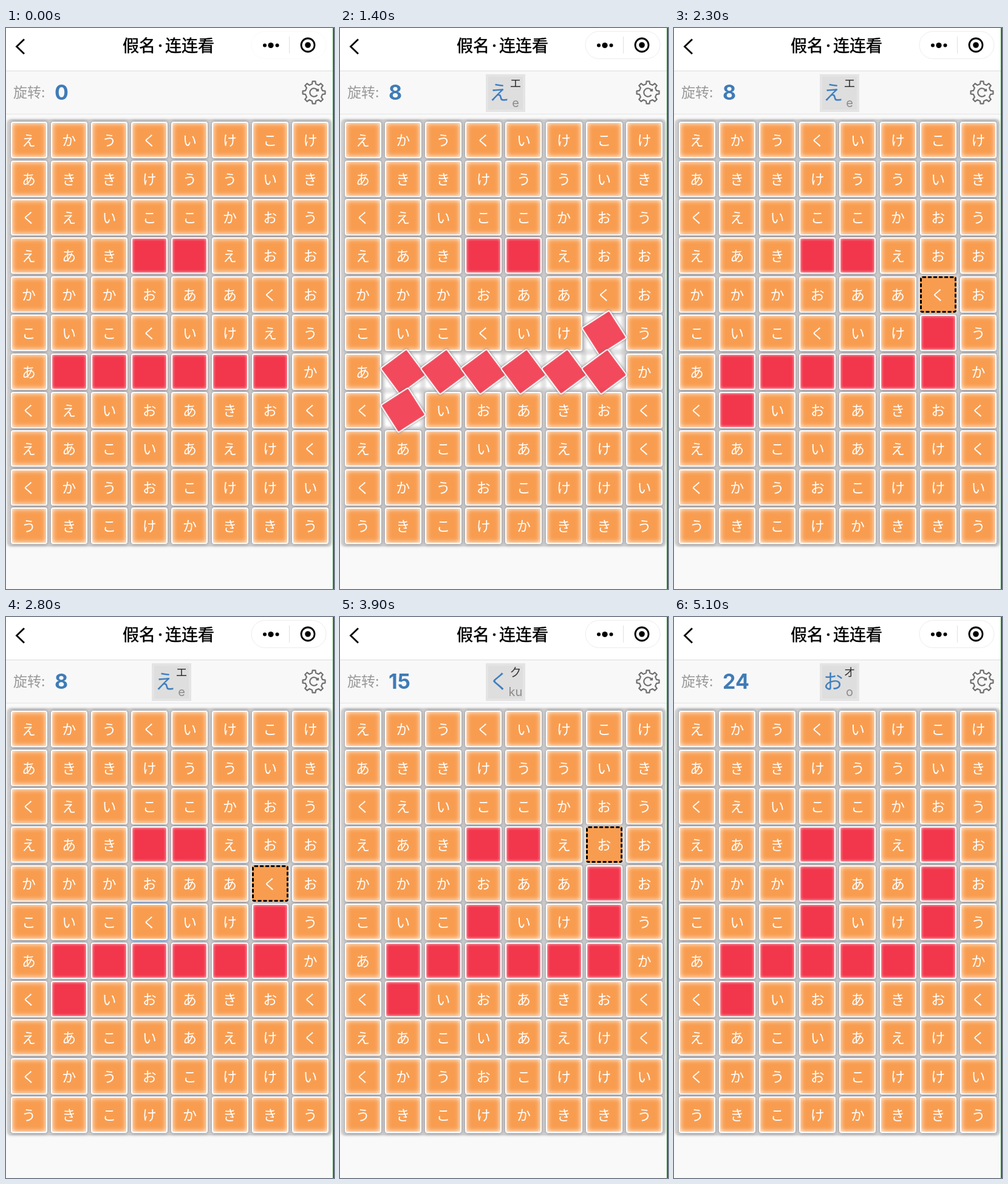
An HTML page for the animation above (5.2 s loop, 540 by 922 pixels).

```html
<!DOCTYPE html>
<html lang="zh">
<head>
<meta charset="utf-8">
<style>
html, body { margin: 0; width: 100%; height: 100%; overflow: hidden; background: #f9f9fa; }
#stage { position: relative; width: 540px; height: 922px; overflow: hidden; font-family: "Noto Sans CJK JP", "Noto Sans CJK SC", sans-serif; }
svg { position: absolute; left: 0; top: 0; }
#board {
  position: absolute; left: 4px; top: 152px; width: 530px; height: 698px;
  background:
    repeating-linear-gradient(90deg, #bbb6 0 2px, #fff0 7px 59px, #bbb6 64.2px 66.2px),
    repeating-linear-gradient(#bbb6 0 2px, #fff0 7px 56px, #bbb6 61.4px 63.4px), #fff;
  box-shadow: 0 0 5px #888;
}
.tile {
  position: absolute; box-sizing: border-box; width: 60px; height: 60px;
  border: 2px solid #fff; border-radius: 4px; background: #f89d50; color: #fff;
  font-size: 23px; font-weight: 300; line-height: 54px; text-align: center;
  box-shadow: 0 0 5px 1px #8a8a90, inset 0 0 8px #fff;
}
.red { background: #f2364c; color: transparent; box-shadow: 0 0 5px 1px #8a8a90, inset 0 0 5px #fffd; }
.spin { z-index: 2; color: transparent; box-shadow: 0 0 5px #777, inset 0 0 2px #fff8; }
.press { z-index: 1; box-shadow: 0 0 4px 2px #6c93cc, inset 0 0 6px #fffc; }
.picked { z-index: 1; border: 3px dashed #000; line-height: 52px; box-shadow: none; }
</style>
</head>
<body>
<div id="stage">
  <svg width="540" height="922" fill="none">
    <path fill="#fff" d="M0 0H540V70H0Z"/>
    <path fill="#f8f8f9" d="M0 71H540V141H0Z"/>
    <path stroke="#dcdcdc" d="M0 70.5H540"/>
    <path stroke="#e4e4e6" d="M0 141.5H540"/>
    <path stroke="#000" stroke-width="2.8" d="M30 18.5L17.5 30.5L30 42.5"/>
    <g fill="#000" stroke="#000" stroke-width=".5" font-size="27" font-weight="500" font-family="Noto Sans CJK SC, sans-serif">
      <text x="192" y="39">假名</text><text x="262" y="39">连连看</text>
      <circle cx="254" cy="29" r="2"/>
    </g>
    <rect id="capsule" x="404" y="5.5" width="123" height="45" rx="22.5" stroke="#ececec"/>
    <path stroke="#e0e0e0" d="M466.5 14V42"/>
    <g fill="#000">
      <circle cx="426" cy="28.5" r="3"/><circle cx="436" cy="28.5" r="4.6"/><circle cx="446.5" cy="28.5" r="3"/>
      <circle cx="497" cy="28" r="4.8"/>
    </g>
    <circle cx="497" cy="28" r="11" stroke="#000" stroke-width="2.8"/>
    <text x="12" y="114" font-size="23" fill="#999" font-family="Noto Sans CJK SC, sans-serif">旋转:</text>
    <text id="score" x="80" y="118" font-size="34" font-weight="700" fill="#3f7cb6" font-family="Inter, sans-serif"></text>
    <g transform="translate(507 106)" stroke="#707070" stroke-width="2.2">
      <path id="gear" stroke-linejoin="round"/>
      <path d="M5.5 -4A6.8 6.8 0 1 0 5.5 4M7 -6V-2.8H3.5"/>
    </g>
    <g id="card">
      <rect x="240" y="76" width="65" height="62" fill="#e4e4e5"/>
      <rect x="244" y="80" width="57" height="54" fill="#dededf"/>
      <text id="kana" x="262" y="118" font-size="33" font-weight="300" text-anchor="middle" fill="#3f7fbd"></text>
      <text id="kata" x="289" y="98" font-size="19" text-anchor="middle" fill="#333"></text>
      <text id="roma" x="289" y="130" font-size="20" text-anchor="middle" fill="#8c8c8c" font-family="Inter, sans-serif"></text>
    </g>
  </svg>
  <div id="board"></div>
  <svg width="540" height="922" style="z-index:3"><path fill="#078a12" d="M538 0H540V922H538Z"/></svg>
</div>
<script>
const LOOP = 5200, SPIN = 600, PRESS = 200;
const rows = ['えかうくいけこけ', 'あききけうういき', 'くえいここかおう', 'えあき  えおお', 'かかかおああくお',
  'こいこくいけえう', 'あ      か', 'くえいおあきおく', 'えあこいあえけく', 'くかうおこけけい', 'うきこけかききう'];
// Each path lists row-column cells, from the first picked tile to the second.
const moves = [
  { picks: [300, 800], start: 1018, card: ['え', 'エ', 'e'], path: '56 66 65 64 63 62 61 71' },
  { picks: [1950, 2650], start: 2895, card: ['く', 'ク', 'ku'], path: '46 56 66 65 64 63 53' },
  { picks: [3700, 4200], start: 4450, card: ['お', 'オ', 'o'], path: '36 46 56 66 65 64 63 53 43' }
];
moves.forEach(m => m.path = m.path.split(' '));

const $ = id => document.getElementById(id);
const tiles = [];
rows.forEach((row, r) => [...row].forEach((kana, c) => {
  const el = document.createElement('div');
  el.textContent = kana;
  el.style.left = 3.6 + c * 66.2 + 'px';
  el.style.top = 2.2 + r * 63.4 + 'px';
  $('board').append(el);
  tiles.push({ el, key: `${r}${c}`, red: kana === ' ' });
}));

let outline = '';
for (let i = 0; i < 8; i++)
  for (const [offset, radius] of [[-.22, 14.3], [-.13, 18.6], [.13, 18.6], [.22, 14.3]]) {
    const a = i * Math.PI / 4 + offset;
    outline += `${outline ? 'L' : 'M'}${radius * Math.sin(a)} ${-radius * Math.cos(a)}`;
  }
$('gear').setAttribute('d', outline + 'Z');

// Cubic bezier (.25, .1, .25, 1), solved by bisection.
function ease(x) {
  let lo = 0, hi = 1;
  for (let i = 0; i < 20; i++) {
    const s = (lo + hi) / 2;
    if (.75 * s * (1 - s) + s ** 3 < x) lo = s; else hi = s;
  }
  return .3 * lo * (1 - lo) ** 2 + 3 * lo * lo * (1 - lo) + lo ** 3;
}

function drawTile({ el, key, red }, t) {
  let state = '', transform = '', opacity = 1;
  for (const { path, picks, start } of moves) {
    const i = path.indexOf(key);
    if (i < 0) continue;
    const end = i === 0 ? 0 : i === path.length - 1 ? 1 : -1;
    const p = (t - start - (end < 0 ? 11 : 0)) / SPIN;
    if (p >= .4) red = true;
    if (p > 0 && p < 1) {
      const dip = Math.min(1, 5 * p, 5 * (1 - p));
      state = 'spin';
      transform = `rotate(${360 * ease(p)}deg) scale(${1 - .08 * dip})`;
      opacity = 1 - .1 * dip;
    } else if (end >= 0 && t >= picks[end] && t < start) {
      state = t < picks[end] + PRESS ? 'press' : 'picked';
    }
  }
  el.className = `tile ${red ? 'red' : ''} ${state}`;
  el.style.transform = transform;
  el.style.opacity = opacity;
}

function draw(now) {
  const t = now % LOOP;
  let score = 0, card = null;
  for (const m of moves) {
    if (t < m.start) break;
    score += t < m.start + 200 ? 2 : m.path.length;
    card = m.card;
  }
  $('score').textContent = score;
  $('card').style.display = card ? '' : 'none';
  if (card) ['kana', 'kata', 'roma'].forEach((id, i) => $(id).textContent = card[i]);
  $('capsule').style.opacity = t < 100 ? .3 : 1;
  tiles.forEach(tile => drawTile(tile, t));
}

const origin = performance.now();
function tick() {
  draw(performance.now() - origin);
  requestAnimationFrame(tick);
}
tick();
</script>
</body>
</html>
```
